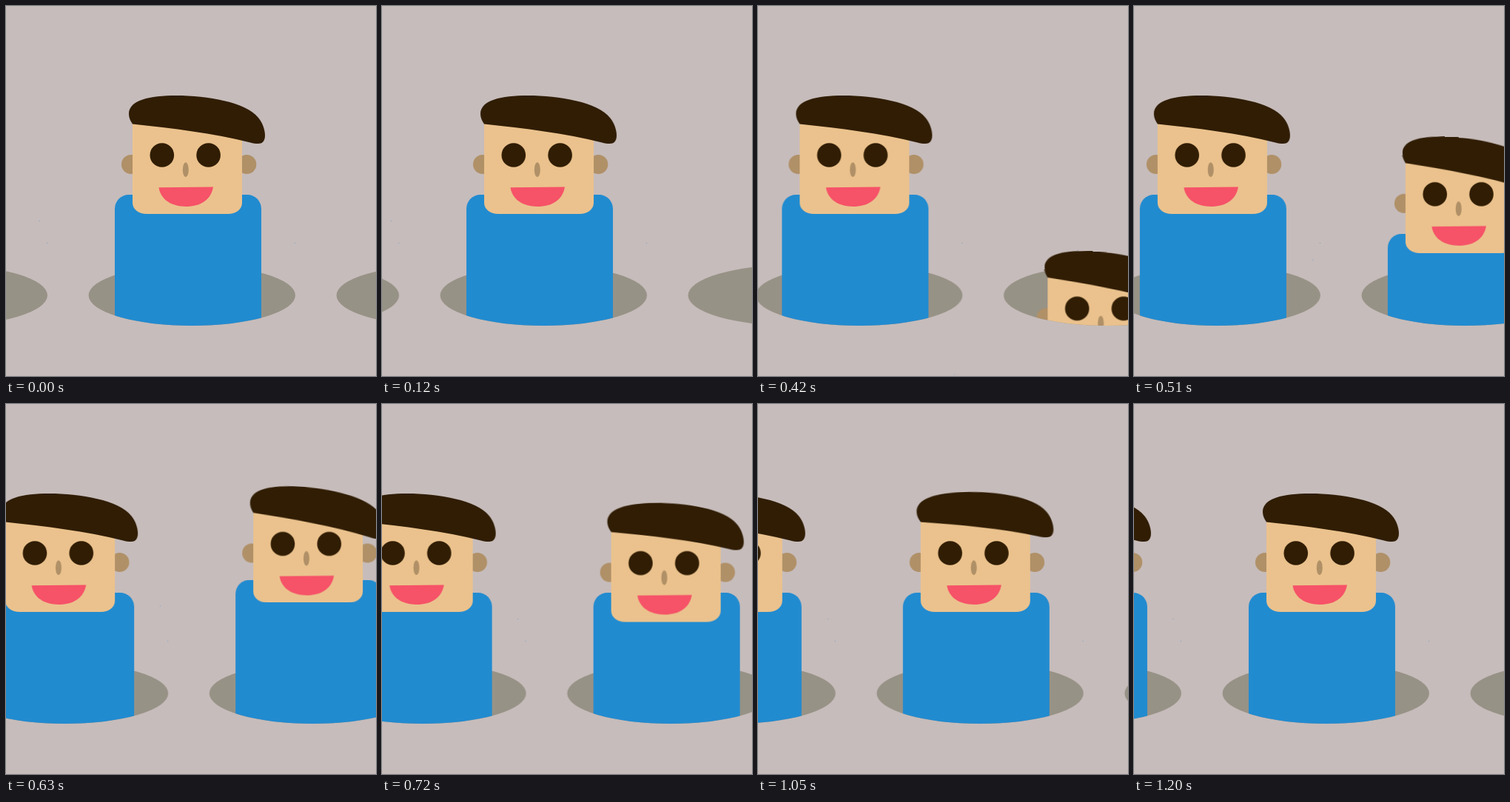
An HTML page for the animation above (1230 ms loop, 500 by 500 pixels).

```html
<!DOCTYPE html>
<html lang="en">
<head>
<meta charset="utf-8">
<title>Pop-up row</title>
<style>
  html, body { margin: 0; width: 100%; height: 100%; overflow: hidden; background: #c6bcbb; }
  svg { display: block; width: 100vw; height: 100vh; }

  .row, .rise, .nod, .tilt { animation: 1230ms linear infinite; }
  .row { animation-name: row; }
  .rise { animation-name: rise; }
  .nod { animation-name: nod; }
  .tilt { animation-name: tilt; transform-origin: 171px 159px; }

  @keyframes row {
    to { transform: translateX(-335px); }
  }
  @keyframes rise {
    0% { transform: translateY(330px); }
    24.39% { transform: translateY(330px); animation-timing-function: cubic-bezier(.4, 0, .8, .65); }
    34.15% { transform: translateY(209px); }
    43.9% { transform: translateY(3px); animation-timing-function: ease-out; }
    47.15% { transform: translateY(-31px); animation-timing-function: ease-in-out; }
    56.1%, 100% { transform: translateY(0); }
  }
  @keyframes nod {
    0% { transform: translateY(0); }
    47.15% { transform: translateY(0); animation-timing-function: cubic-bezier(.3, .3, .6, 1); }
    64.23% { transform: translateY(16px); animation-timing-function: ease-in-out; }
    82.93%, 100% { transform: translateY(0); }
  }
  @keyframes tilt {
    0% { transform: rotate(3deg); }
    50.4% { transform: rotate(3deg); animation-timing-function: ease-in-out; }
    65.04% { transform: rotate(-3.2deg); }
    78.05% { transform: rotate(-3.2deg); animation-timing-function: ease-in-out; }
    95.12%, 100% { transform: rotate(0); }
  }
</style>
</head>
<body>
<svg viewBox="0 0 500 500">
  <defs>
    <clipPath id="opening">
      <path d="M111.6 391V0H391V391A139.7 41 0 0 1 111.6 391Z"/>
    </clipPath>
    <g id="hole">
      <ellipse cx="251.3" cy="391" rx="139.7" ry="41" fill="#979286"/>
      <circle cx="390.5" cy="320.5" r=".5" fill="#4d9fd2"/>
    </g>
    <circle id="speck" cx="45.3" cy="290.5" r=".5" fill="#4d9fd2"/>
    <rect id="torso" x="147" y="255" width="198" height="560" rx="19" fill="#218bd0"/>
    <g id="head">
      <g fill="#b09067">
        <circle cx="169" cy="214" r="13"/>
        <circle cx="325.3" cy="214" r="13"/>
      </g>
      <path d="M171 150H319V266C319 275 310 281 300 281H190C180 281 171 275 171 266Z" fill="#ebc28d"/>
      <g fill="#301d04">
        <circle cx="210.8" cy="201.5" r="16.3"/>
        <circle cx="273.6" cy="201.5" r="16.3"/>
      </g>
      <ellipse cx="242.8" cy="221.3" rx="4" ry="10" fill="#b09067"/>
      <path d="M206.5 245.3L280 244.5C277 262 263 271 243 271C224 271 209 262 206.5 245.3Z" fill="#f65268"/>
    </g>
    <path id="hair" fill="#301d04" d="M171 159.5C168 155 166 151 166 146C166 127 194 121 230 121C272 121 325 130 341 151C347 158 350 168 350 175C350 183 346 186 341 186C337 186 334 185.5 330 184.5C280 172 225 165 171 159.5Z"/>
  </defs>

  <g class="row">
    <use href="#hole" x="-335"/>
    <use href="#hole"/>
    <use href="#hole" x="335"/>
    <use href="#hole" x="670"/>

    <use href="#speck"/>
    <g clip-path="url(#opening)">
      <use href="#torso"/>
      <use href="#head"/>
      <use href="#hair"/>
    </g>

    <g transform="translate(335)">
      <g class="rise"><use href="#speck"/></g>
      <g clip-path="url(#opening)">
        <g class="rise">
          <use href="#torso"/>
          <g class="nod">
            <use href="#head"/>
            <g class="tilt"><use href="#hair"/></g>
          </g>
        </g>
      </g>
    </g>
  </g>
</svg>
</body>
</html>
```
